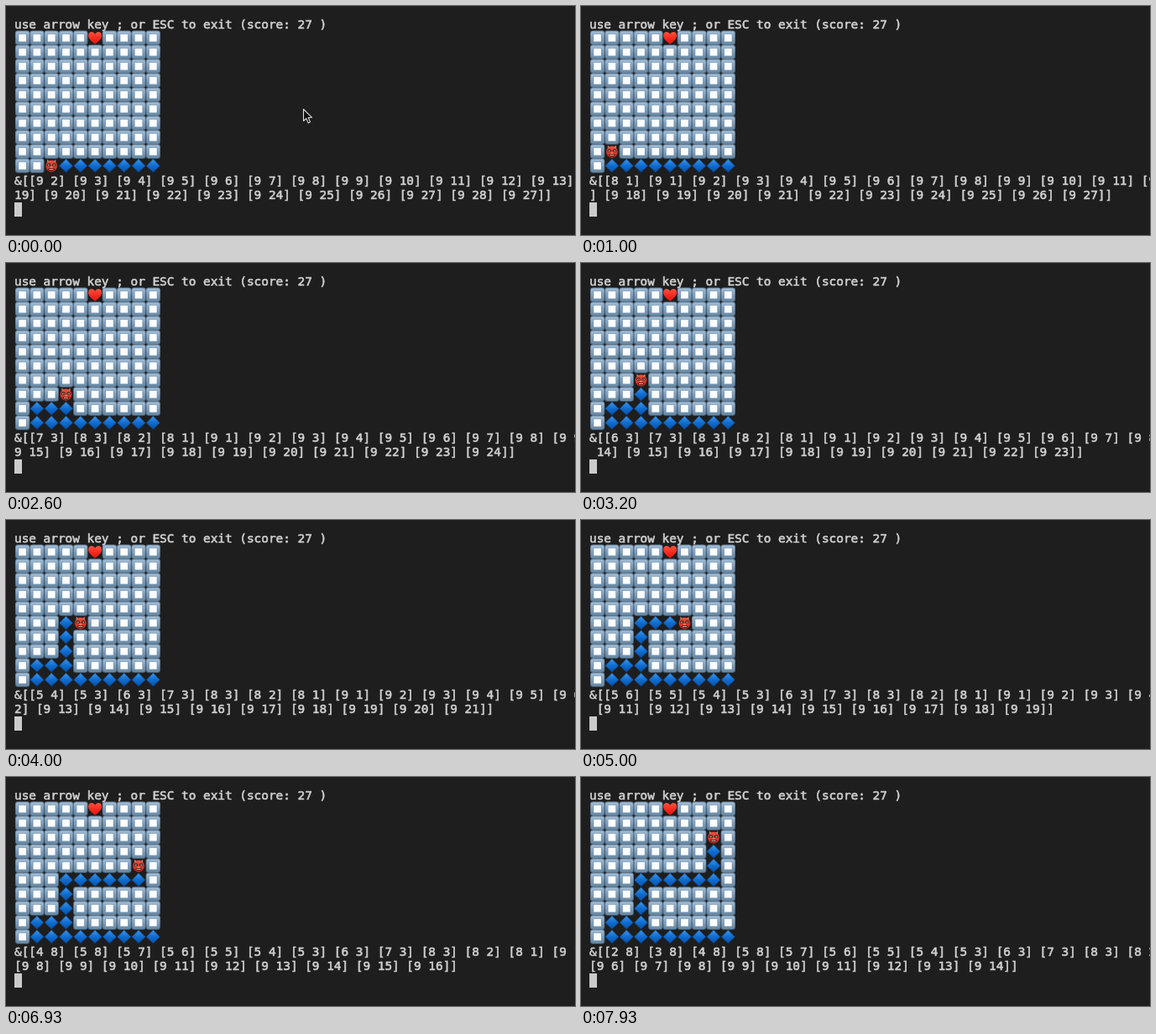
Animation, 678 px wide and 274 px high, one loop 8000 ms. Source, as an HTML page with a canvas:

```html
<!DOCTYPE html>
<html lang="en">
<head>
<meta charset="utf-8">
<title>Terminal snake</title>
<style>
  html, body { margin: 0; width: 100%; height: 100%; overflow: hidden; background: #1e1e1e; }
  canvas { display: block; }
</style>
</head>
<body>
<canvas id="stage" width="678" height="274"></canvas>
<script>
const ctx = document.getElementById('stage').getContext('2d');

const LOOP = 8000, FRAME = 1000 / 15, STEP = 500, LEAD = 50;
const POINTER_HIDE = 600;
const SIZE = 10, LENGTH = 28, COLUMNS = 116;
const LEFT = 10, CHAR = 8.655, LINE = 17, BASE = 27;
const FOOD = [0, 5];
const MOVES = 'LURRUUURRRRRUUU';
const DELTA = { L: [0, -1], R: [0, 1], U: [-1, 0] };

// Every position from the last head back to the end of the first tail.
const trail = [];
for (let col = 2; col <= 28; col++) trail.push([9, col]);
trail.push([9, 27]);
for (const move of MOVES) {
  const [row, col] = trail[0], [dr, dc] = DELTA[move];
  trail.unshift([row + dr, col + dc]);
}

function snakeAt(step) {
  const start = MOVES.length - step;
  return trail.slice(start, start + LENGTH);
}

function text(str, line) {
  const y = BASE + line * LINE;
  for (let i = 0; i < str.length && i < 80; i++) {
    if (str[i] === ' ') continue;
    const x = LEFT + i * CHAR;
    ctx.fillText(str[i], x, y);
    ctx.strokeText(str[i], x, y);
  }
}

function gradient(y0, y1, ...colors) {
  const g = ctx.createLinearGradient(0, y0, 0, y1);
  colors.forEach((c, i) => g.addColorStop(i / (colors.length - 1), c));
  return g;
}

function polygon(points, fill) {
  ctx.beginPath();
  points.forEach(([x, y]) => ctx.lineTo(x, y));
  ctx.closePath();
  ctx.fillStyle = fill;
  ctx.fill();
}

function box(half, radius, fill) {
  ctx.beginPath();
  ctx.roundRect(-half, -half, half * 2, half * 2, radius);
  ctx.fillStyle = fill;
  ctx.fill();
}

function oval(x, y, rx, ry, fill) {
  ctx.beginPath();
  ctx.ellipse(x, y, rx, ry, 0, 0, Math.PI * 2);
  ctx.fillStyle = fill;
  ctx.fill();
}

function button() {
  box(8.6, 3.2, gradient(-8.5, 8.5, '#7893ad', '#5f7f9b', '#4a6682'));
  box(7.7, 2.8, gradient(-8, 8, '#a3bed6', '#809fbc', '#66869f'));
  box(5.1, 1, '#7594b1');
  box(4.4, 0.5, '#fcfdfe');
}

function diamond() {
  polygon([[0, -8.2], [8.2, 0], [0, 8.2], [-8.2, 0]],
    gradient(-8, 8, '#2a7fd0', '#0c5cb4', '#083f86'));
  polygon([[0, -6.9], [6.9, 0], [0, 6.9], [-6.9, 0]],
    gradient(-7, 7, '#3a92ea', '#0f6ccf', '#0856ac'));
}

function heart() {
  ctx.beginPath();
  ctx.moveTo(0, 7.3);
  ctx.bezierCurveTo(-3, 5, -8, 1.4, -8, -2.8);
  ctx.bezierCurveTo(-8, -7.8, -2, -8.6, 0, -4.4);
  ctx.bezierCurveTo(2, -8.6, 8, -7.8, 8, -2.8);
  ctx.bezierCurveTo(8, 1.4, 3, 5, 0, 7.3);
  ctx.fillStyle = gradient(-7, 8, '#ff5140', '#f8291f', '#d8150f');
  ctx.fill();
}

function ogre() {
  oval(0, 0.2, 7.3, 7.3, '#6b2019');
  oval(0, 0.4, 6.6, 6.8, gradient(-6, 8, '#e8503e', '#d83a2c', '#b52a20'));
  for (const side of [-1, 1]) {
    polygon([[side * 5, -7.6], [side * 2.6, -5.2], [side * 5.2, -4.2]], '#b98a76');
    oval(side * 3.1, -1, 2.2, 1.9, '#35110e');
    oval(side * 3.1, -0.7, 1.3, 1, '#eadcc0');
    oval(side * 2.9, -0.6, 0.6, 0.7, '#1c0e0c');
  }
  oval(0, 1.7, 1.8, 1.1, '#f2745c');
  oval(0, 4.4, 3.9, 1.4, '#4a120f');
  ctx.fillStyle = '#dfc5b6';
  ctx.fillRect(-2.5, 3.8, 5, 0.9);
}

function pointer() {
  ctx.save();
  ctx.translate(354.5, 123.5);
  ctx.beginPath();
  [[0, 0], [0, 14], [3.3, 11], [5.6, 16.4], [8, 15.3], [5.7, 10.1], [10, 9.8]]
    .forEach(([x, y]) => ctx.lineTo(x, y));
  ctx.closePath();
  ctx.fillStyle = '#111';
  ctx.strokeStyle = '#dcdcdc';
  ctx.lineWidth = 1.1;
  ctx.fill();
  ctx.stroke();
  ctx.restore();
}

function board(snake) {
  const same = (a, b) => a[0] === b[0] && a[1] === b[1];
  for (let row = 0; row < SIZE; row++) {
    for (let col = 0; col < SIZE; col++) {
      const cell = [row, col];
      const part = snake.findIndex(p => same(p, cell));
      ctx.save();
      ctx.translate(19.6 + col * 17.3, 38.2 + row * LINE);
      if (part === 0) ogre();
      else if (part > 0) diamond();
      else if (same(cell, FOOD)) heart();
      else button();
      ctx.restore();
    }
  }
}

function render(ms) {
  // Screen updates land on a 15 fps clock.
  const t = Math.floor((ms % LOOP) / FRAME + 1e-6) * FRAME;
  const step = Math.min(MOVES.length, Math.floor((t + LEAD) / STEP));
  const snake = snakeAt(step);

  ctx.fillStyle = '#1e1e1e';
  ctx.fillRect(0, 0, 678, 274);
  board(snake);

  ctx.font = '14.4px "DejaVu Sans Mono", monospace';
  ctx.fillStyle = ctx.strokeStyle = '#d0d0d0';
  ctx.lineWidth = 0.6;
  ctx.lineJoin = 'round';
  const dump = '&[' + snake.map(p => `[${p.join(' ')}]`).join(' ') + ']';
  text('use arrow key ; or ESC to exit (score: 27 )', 0);
  text(dump.slice(0, COLUMNS), 11);
  text(dump.slice(COLUMNS), 12);

  ctx.fillStyle = '#cbcbcb';
  ctx.fillRect(LEFT, 235, 9, 17);
  if (t < POINTER_HIDE) pointer();
}

const begin = performance.now();
function tick() {
  render(performance.now() - begin);
  requestAnimationFrame(tick);
}
tick();
</script>
</body>
</html>
```
